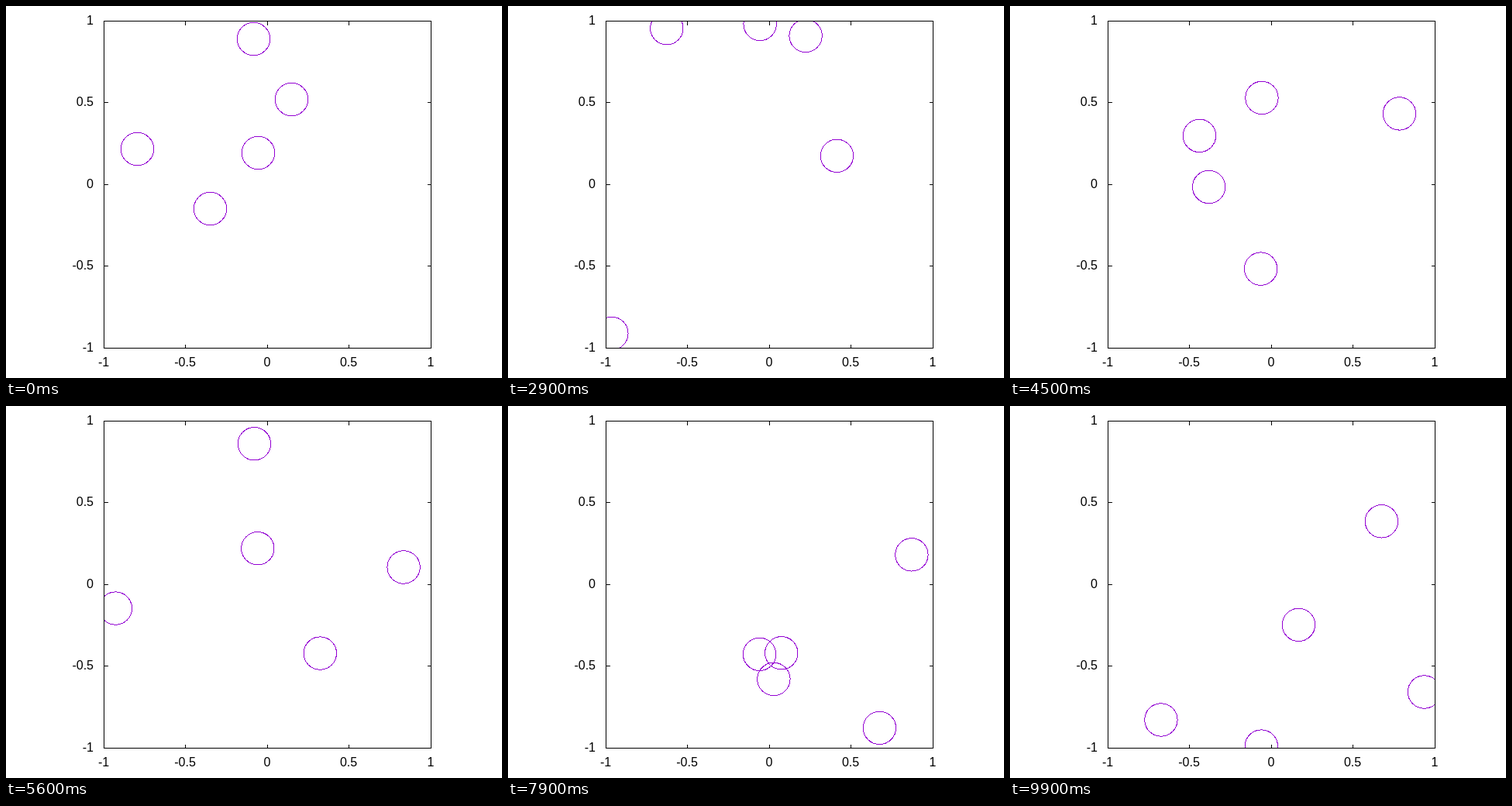
An HTML page that plays this animation: 640x480 px, repeating every 10000 ms.

```html
<!DOCTYPE html>
<html lang="en">
<head>
<meta charset="utf-8">
<title>Bouncing circles</title>
<style>
  html, body { margin: 0; width: 100%; height: 100%; overflow: hidden; background: #fff; }
  svg { display: block; width: 640px; height: 480px; }
  text { font: 16px "Liberation Sans", Arial, sans-serif; fill: #000; }
  .line { fill: none; stroke: #000; shape-rendering: crispEdges; }
  circle { fill: none; stroke: #9400d3; shape-rendering: crispEdges; }
</style>
</head>
<body>
<svg viewBox="0 0 640 480">
  <clipPath id="plot"><rect x="126" y="19" width="423" height="423"/></clipPath>
  <g id="balls" clip-path="url(#plot)"></g>
  <g id="axes"></g>
</svg>
<script>
const STEP = 100, STEPS = 100;
const RADIUS = 21.2;
const LEFT = 126.5, RIGHT = 548.5, TOP = 19.5, BOTTOM = 441.5;
const WALLS_X = [126.5, 548.5], WALLS_Y = [20.4, 441.5];

// Start position and velocity per step, in pixels
const balls = [
  { x: 319.5, y: 42.5, vx: -6.91, vy: -15.94 },
  { x: 368.5, y: 120.5, vx: 10.485, vy: 2.51 },
  { x: 169.5, y: 184.5, vx: 7.4, vy: -6.28 },
  { x: 325.5, y: 189.5, vx: -0.012, vy: -5.937 },
  { x: 263.5, y: 261.5, vx: -7.425, vy: 20.44 }
];

function add(parent, name, attrs, text = "") {
  const node = document.createElementNS("http://www.w3.org/2000/svg", name);
  for (const key in attrs) node.setAttribute(key, attrs[key]);
  node.textContent = text;
  parent.append(node);
  return node;
}

function drawAxes() {
  const axes = document.getElementById("axes");
  const line = d => add(axes, "path", { class: "line", d });
  line(`M${LEFT} ${TOP}H${RIGHT}V${BOTTOM}H${LEFT}Z`);
  [-1, -0.5, 0, 0.5, 1].forEach((value, i) => {
    const x = Math.floor(126.3 + i * 105.5) + 0.5;
    const y = Math.floor(441 - i * 105.5) + 0.5;
    line(`M${x} ${TOP}v5M${x} ${BOTTOM}v-5M${LEFT} ${y}h5M${RIGHT} ${y}h-5`);
    add(axes, "text", { x: x - 0.5, y: 465, "text-anchor": "middle" }, value);
    add(axes, "text", { x: 113, y: y + 4.5, "text-anchor": "end" }, value);
  });
}

// Mirrors a straight path between two walls
function bounce(position, [low, high]) {
  const span = high - low;
  const offset = (((position - low) % (2 * span)) + 2 * span) % (2 * span);
  return low + (offset > span ? 2 * span - offset : offset);
}

function render(time) {
  const n = Math.floor(time / STEP) % STEPS;
  for (const ball of balls) {
    ball.node.setAttribute("cx", bounce(ball.x + ball.vx * n, WALLS_X));
    ball.node.setAttribute("cy", bounce(ball.y + ball.vy * n, WALLS_Y));
  }
}

drawAxes();
const layer = document.getElementById("balls");
for (const ball of balls) ball.node = add(layer, "circle", { r: RADIUS });

const start = performance.now();
function tick() {
  render(performance.now() - start);
  requestAnimationFrame(tick);
}
tick();
</script>
</body>
</html>
```
